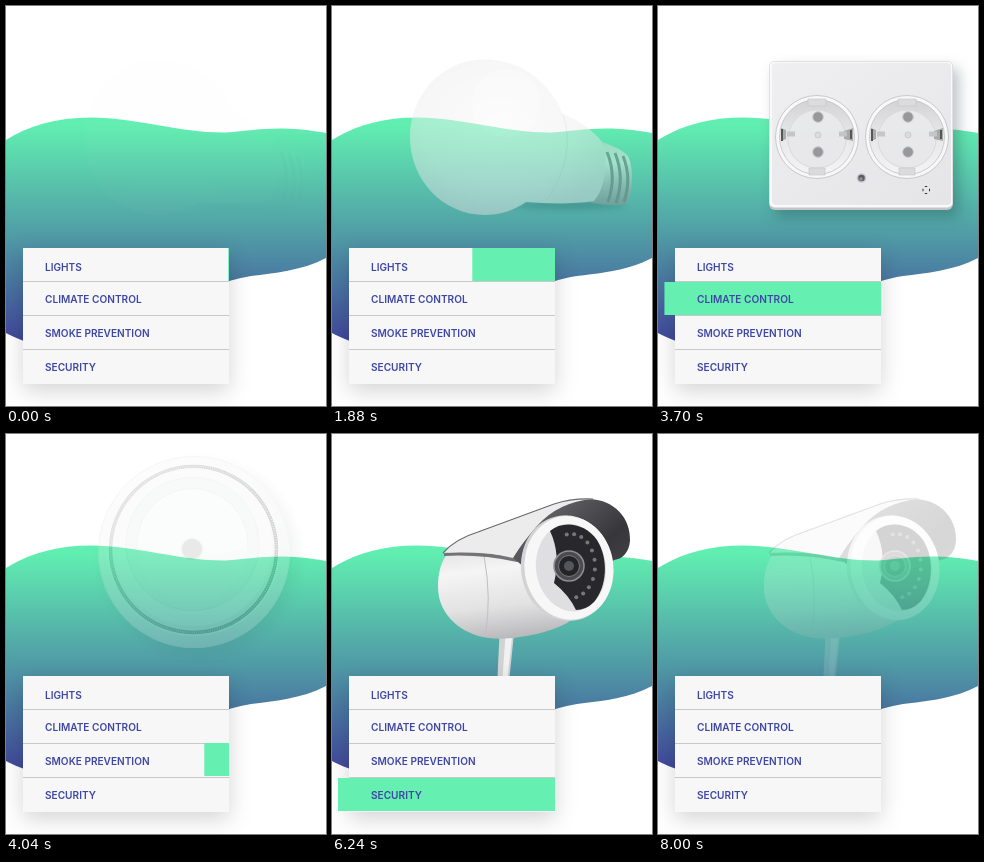
Recreate the animation shown at these times as an HTML page. Size 320 by 400 pixels, loop 8020 ms.

```html
<!DOCTYPE html>
<html lang="en">
<head>
<meta charset="utf-8">
<title>Smart home menu</title>
<style>
  html, body { margin: 0; width: 100%; height: 100%; overflow: hidden; background: #fff; }
  svg { display: block; width: 100%; height: 100%; }
  #menu text { font: 600 10.1px Inter, Arial, sans-serif; fill: #3f47a5; }
  .card { filter: drop-shadow(0 7px 11px rgba(0, 0, 0, .17)); }
  .soft { filter: drop-shadow(6px 7px 7px rgba(20, 40, 50, .28)); }
  .blur { filter: blur(3px); }
</style>
</head>
<body>
<svg viewBox="0 0 320 400">
  <defs>
    <linearGradient id="sea" gradientUnits="userSpaceOnUse" x1="0" y1="118" x2="0" y2="345">
      <stop stop-color="#61efb1"/><stop offset=".5" stop-color="#509aa6"/><stop offset="1" stop-color="#3f3f99"/>
    </linearGradient>
    <radialGradient id="glass" cx=".45" cy=".42" r=".62">
      <stop stop-color="#f7f7f7"/><stop offset=".65" stop-color="#efefef"/><stop offset="1" stop-color="#dedede"/>
    </radialGradient>
    <linearGradient id="metal" x1="0" y1="0" x2="0" y2="1">
      <stop stop-color="#d6d6d6"/><stop offset=".35" stop-color="#f1f1f1"/><stop offset=".7" stop-color="#b5b5b5"/><stop offset="1" stop-color="#8d8d8d"/>
    </linearGradient>
    <linearGradient id="plate" x1="0" y1="0" x2="1" y2="1">
      <stop stop-color="#efeff1"/><stop offset="1" stop-color="#e6e6e9"/>
    </linearGradient>
    <linearGradient id="well" x1="0" y1="0" x2="0" y2="1">
      <stop stop-color="#d3d3d6"/><stop offset=".5" stop-color="#e8e8ea"/><stop offset="1" stop-color="#f5f5f6"/>
    </linearGradient>
    <linearGradient id="disc" x1=".2" y1="0" x2=".8" y2="1">
      <stop stop-color="#f4f4f4"/><stop offset=".55" stop-color="#eaebeb"/><stop offset="1" stop-color="#d5d7d8"/>
    </linearGradient>
    <linearGradient id="vent" x1="0" y1="0" x2="1" y2=".7">
      <stop stop-color="#898b8b"/><stop offset="1" stop-color="#383a3a"/>
    </linearGradient>
    <linearGradient id="tube" x1=".35" y1="0" x2=".5" y2="1">
      <stop stop-color="#d9d9da"/><stop offset=".35" stop-color="#f5f5f5"/><stop offset=".7" stop-color="#e2e2e3"/><stop offset="1" stop-color="#b9b9bb"/>
    </linearGradient>
    <linearGradient id="hood" x1="0" y1="0" x2="1" y2="1">
      <stop offset=".2" stop-color="#626266"/><stop offset=".6" stop-color="#36363b"/><stop offset="1" stop-color="#4d4d52"/>
    </linearGradient>
    <g id="outlet">
      <circle r="41.5" fill="#f8f8f9" stroke="#c9c9cd"/>
      <circle r="37.5" fill="url(#well)" stroke="#c2c2c6" stroke-width=".8"/>
      <circle cy="2" r="29" fill="#e9e9eb" stroke="#dadadd"/>
      <path d="M-9-38h18v7h-18zM-8 31h16v7h-16z" fill="#dcdcdf" stroke="#c3c3c7" stroke-width=".6"/>
      <path d="M-36-9l5 2v9l-5 2zM36-9l-9 3v8l9 2z" fill="#aaa9a8"/>
      <path d="M-35-8v12M34-7v9" stroke="#55555a" stroke-width="2"/>
      <path d="M-30-3h8M22-3h8" stroke="#c5c5c8" stroke-width="5"/>
      <g fill="#98989b" stroke="#c8c8cb"><circle cx="1" cy="-20" r="5.3"/><circle cx="1" cy="15" r="5.3"/></g>
      <circle cx="1" cy="-2" r="3" fill="#dcdcdf" stroke="#cbcbcf"/>
    </g>
  </defs>

  <path fill="url(#sea)" d="M0 134C22 120 50 111.5 85 111.5C132 112 175 127 220 126.5C245 125 272 118 320 127V252C295 265 268 267 245 270C190 278 150 320 90 340C60 350 20 338 0 327Z"/>

  <g class="device" id="bulb">
    <ellipse class="blur" cx="237" cy="199" rx="57" ry="4" fill="#174e55" opacity=".6"/>
    <path fill="url(#metal)" d="M262 133C276 138 290 143 296 150C302 163 301 187 295 197C285 201 270 199 257 196Z"/>
    <path d="M275 146q10 24 1 50M283 147q10 24 1 50M291 150q9 22 1 46" fill="none" stroke="#747474" stroke-width="3"/>
    <path fill="url(#glass)" d="M153 53.500C192 54 218 78 231 108C246 114 260 123 270 136C277 155 273 183 262 195C237 199 212 197 194 196C181 205 167 209 153 209C111 209 78 174 78 131C78 88 111 53 153 53.500Z"/>
    <path d="M231 108Q245 150 214 196" fill="none" stroke="#dadada"/>
    <circle cx="174" cy="97" r="34" fill="#fff" opacity=".25"/>
  </g>

  <g class="device" id="sockets">
    <g class="soft">
      <rect x="111" y="55" width="184" height="149" rx="6" fill="#c6c6ca"/>
      <rect x="111.500" y="55.500" width="183" height="146" rx="5" fill="#fafafa"/>
      <rect x="114" y="57" width="179" height="142" rx="4" fill="url(#plate)"/>
    </g>
    <use href="#outlet" x="159" y="131"/>
    <use href="#outlet" x="249" y="131"/>
    <circle cx="203.500" cy="172" r="4" fill="#5c5c60" stroke="#c4c4c8" stroke-width="1.500"/>
    <circle cx="203" cy="173" r="1.800" fill="#929296"/>
    <path d="M268 180v1M268 187v1M264.500 184h1M271 184h1" stroke="#333338" stroke-width="2.400"/>
  </g>

  <g class="device" id="detector">
    <circle class="soft" cx="188" cy="118" r="96" fill="url(#disc)"/>
    <circle cx="188" cy="118" r="95.500" fill="none" stroke="#d4d6d6"/>
    <circle cx="187.500" cy="116" r="86" fill="#f5f5f5"/>
    <circle cx="187.500" cy="115.500" r="83" fill="url(#disc)" stroke="url(#vent)" stroke-width="3.500"/>
    <circle cx="187.500" cy="115.500" r="83" fill="none" stroke="#c4c6c6" stroke-width="2" stroke-dasharray=".7 1.600"/>
    <circle cx="187" cy="113" r="79" fill="#eff0f0"/>
    <circle cx="186.500" cy="110" r="66.500" fill="#e4e7e7" stroke="#c5c9c9" stroke-width=".8"/>
    <circle cx="186.500" cy="110" r="55.500" fill="#f0f2f2" stroke="#c5c9c9" stroke-width=".8"/>
    <path d="M131 113Q187 130 242 113A55.500 55.500 0 0 1 131 113Z" fill="#e8ebeb"/>
    <circle cx="186" cy="115" r="10.500" fill="#9c9d98" stroke="#cfd2d0"/>
  </g>

  <g class="device" id="camera">
    <path d="M168 190h15L177.500 243h-12Z" fill="#d2d3d5"/>
    <path d="M174 195h7L175.500 243h-5Z" fill="#f1f1f2"/>
    <path d="M117 118L205 98L238 187C220 199 180 207 157 204C131 201 106 182 106 153C106 139 109 126 117 118Z" fill="url(#tube)"/>
    <path d="M152 122Q160 164 153 203" fill="none" stroke="#c0c0c2"/>
    <path d="M112 119Q148 117 190 124L185 128Q148 120 112 122Z" fill="#737377"/>
    <path d="M180 123C195 92 222 64 258 65C282 66 299 84 298 107C297 118 291 125 282 126L236 170Z" fill="url(#hood)"/>
    <path d="M111 119Q123 105 146 98L222 70Q240 64 261 65Q226 68 205 92Q190 109 181 124Q143 115 111 119Z" fill="#ececed"/>
    <path d="M111 119Q123 105 146 98L222 70Q240 64 261 65" fill="none" stroke="#69696d" stroke-width="1.200"/>
    <g transform="rotate(-8 236 134)">
      <ellipse cx="235" cy="134" rx="46" ry="53" fill="#d3d3d5"/>
      <ellipse cx="237" cy="134" rx="44.500" ry="52" fill="#f7f7f7"/>
      <ellipse cx="239" cy="134" rx="35" ry="44" fill="#dfdfe1"/>
    </g>
    <path d="M218 97C231 86 253 89 265 106C277 125 275 153 262 168Q254 176 244 176Q237 161 222 149Q229 120 218 97Z" fill="#28282c"/>
    <g id="leds" fill="#77777c"></g>
    <circle cx="237" cy="132" r="15" fill="#4b4b50" stroke="#909094" stroke-width="1.500"/>
    <circle cx="237" cy="132" r="10.500" fill="#242428" stroke="#77777b"/>
    <circle cx="237" cy="132" r="5" fill="#55565d"/>
  </g>

  <g id="menu">
    <rect class="card" x="17" y="242" width="206" height="136" fill="#f7f7f8"/>
    <path d="M17 275.500H223M17 309.500H223M17 343.500H223" stroke="#c8c8ca"/>
  </g>
</svg>
<script>
const LOOP = 8020, OUT_TIME = 280, FADE_TIME = 350, LEFT = 6, RIGHT = 223;
const items = [
  { label: 'LIGHTS', device: 'bulb', top: 242, base: 264.5, start: 0, rise: 280, end: 1700 },
  { label: 'CLIMATE CONTROL', device: 'sockets', top: 276, base: 297, start: 2000, rise: 260, end: 3700 },
  { label: 'SMOKE PREVENTION', device: 'detector', top: 309, base: 331, start: 4000, rise: 360, end: 5680 },
  { label: 'SECURITY', device: 'camera', top: 344, base: 364.5, start: 5980, rise: 260, end: 7720 }
];
const clamp = v => Math.max(0, Math.min(1, v));

function add(parent, tag, attrs, text = '') {
  const node = document.createElementNS('http://www.w3.org/2000/svg', tag);
  for (const key in attrs) node.setAttribute(key, attrs[key]);
  node.textContent = text;
  return parent.appendChild(node);
}

const menu = document.getElementById('menu');
for (const item of items) {
  item.node = document.getElementById(item.device);
  item.bar = add(menu, 'rect', { y: item.top, height: 33, fill: '#65f0b2' });
  add(menu, 'text', { x: 39, y: item.base }, item.label);
}

const leds = document.getElementById('leds');
for (let i = 0; i < 11; i++) {
  const a = -1.75 + i * 0.31;
  add(leds, 'circle', { cx: 239 + 24 * Math.cos(a), cy: 132 + 32 * Math.sin(a), r: 2 });
}

function draw(t) {
  for (const { node, bar, start, rise, end } of items) {
    const entering = clamp((t - start) / rise);
    const leaving = clamp((t - end) / OUT_TIME);
    const shown = t < end + OUT_TIME + 20;
    const width = (RIGHT - LEFT) * (t < end ? entering : 1 - leaving ** 1.1);
    bar.setAttribute('x', RIGHT - width);
    bar.setAttribute('width', width);
    const alpha = t < end ? entering ** 0.7 : clamp(1 - (t - end) / FADE_TIME);
    node.setAttribute('opacity', shown ? alpha : 0);
  }
}

const begun = performance.now();
function tick() {
  draw((performance.now() - begun) % LOOP);
  requestAnimationFrame(tick);
}
draw(0);
requestAnimationFrame(tick);
</script>
</body>
</html>
```
